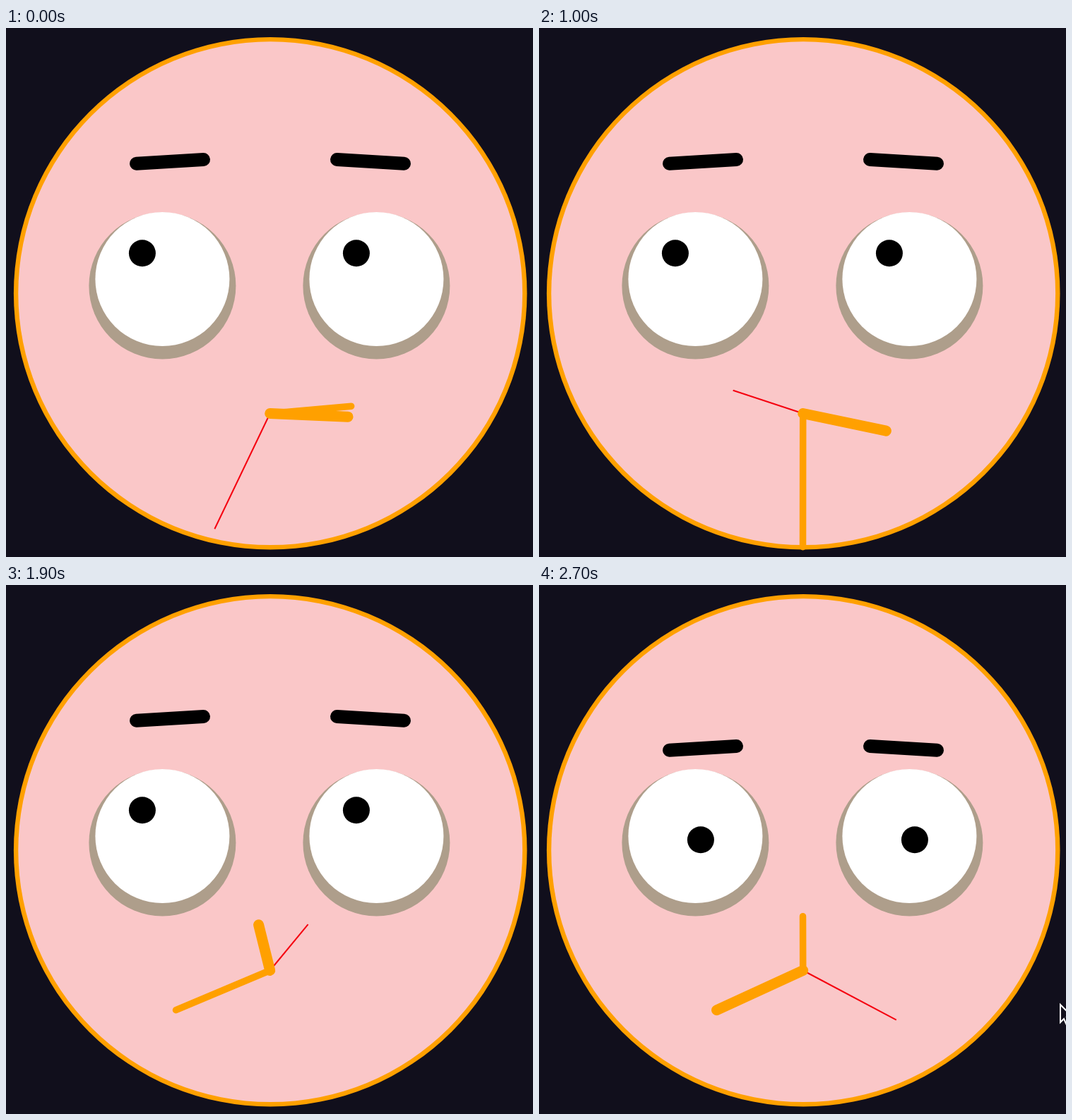
These frames come from a looping animation (746 by 750 pixels, 2.8 s). An HTML page with a canvas:

```html
<!DOCTYPE html>
<html lang="en">
<head>
<meta charset="utf-8">
<title>Clock face</title>
<style>
  html, body { margin: 0; height: 100%; overflow: hidden; background: #110f1c; }
  canvas { display: block; }
</style>
</head>
<body>
<canvas id="stage" width="746" height="750"></canvas>
<script>
const ctx = document.getElementById('stage').getContext('2d');
const LOOP = 2800, STEP = 100, LAST = 27;
const SKINS = ['#fac7c8', '#f0ebe3', '#0606dc'];
const ORANGE = '#ffa000';
const PIVOT = { x: 373.7, y: 546.5 };
const DIAL = { x: 373.5, y: 602.7 };

function disc(x, y, r, color) {
  ctx.fillStyle = color;
  ctx.beginPath();
  ctx.arc(x, y, r, 0, Math.PI * 2);
  ctx.fill();
}

function line(x1, y1, x2, y2, width, color, cap = 'round') {
  ctx.strokeStyle = color;
  ctx.lineWidth = width;
  ctx.lineCap = cap;
  ctx.beginPath();
  ctx.moveTo(x1, y1);
  ctx.lineTo(x2, y2);
  ctx.stroke();
}

// Hands start at the pivot but their tips run on a dial centred below it.
function hand(degrees, radius, width, color, cap) {
  const a = degrees * Math.PI / 180;
  line(PIVOT.x, PIVOT.y, DIAL.x + radius * Math.sin(a), DIAL.y - radius * Math.cos(a), width, color, cap);
}

function eye(x, lookX, lookY) {
  disc(x, 365.5, 104, '#ae9e8b');
  disc(x, 356, 95, '#fff');
  disc(x - 28.5 + lookX, 319.3 + lookY, 19, '#000');
}

function pointer(x, y) {
  ctx.beginPath();
  [[0, 0], [0, 25], [5, 20], [9, 29], [13, 27], [9, 18], [17, 17]]
    .forEach(([dx, dy]) => ctx.lineTo(x + dx, y + dy));
  ctx.closePath();
  ctx.fillStyle = '#110f1c';
  ctx.fill();
  ctx.strokeStyle = '#fff';
  ctx.lineWidth = 2;
  ctx.stroke();
}

function draw(time) {
  const n = Math.floor(time % LOOP / STEP);
  const alert = n === LAST;
  // The clock ticks on every third step; the skin changes on the other two.
  const tick = Math.floor((n + 2) / 3) + (alert ? 1 : 0);
  const skin = SKINS[Math.floor(2 * n / 3) % SKINS.length];
  const hours = 2 + 3 * tick, minutes = 10 + 5 * tick, seconds = 36 + 4 * tick;
  const lookX = alert ? 36 : 0, lookY = alert ? 42 : 0;

  ctx.fillStyle = '#110f1c';
  ctx.fillRect(0, 0, 746, 750);
  disc(374.2, 376.3, 363.3, ORANGE);
  disc(374.2, 376.2, 356.9, skin);

  line(184.5, 192.2 + lookY, 279.5, 186.5 + lookY, 19, '#000');
  line(468.5, 186.5 + lookY, 563.5, 192.2 + lookY, 19, '#000');
  eye(221.4, lookX, lookY);
  eye(524.4, lookX, lookY);

  hand(seconds * 6, 133, 2, '#f5000f', 'butt');
  hand(minutes * 6, 133, 9.5, ORANGE);
  hand(hours * 30 + minutes / 2, 122, 15, ORANGE);

  if (alert) pointer(738, 595);
}

const start = performance.now();
function loop() {
  draw(performance.now() - start);
  requestAnimationFrame(loop);
}
loop();
</script>
</body>
</html>
```
